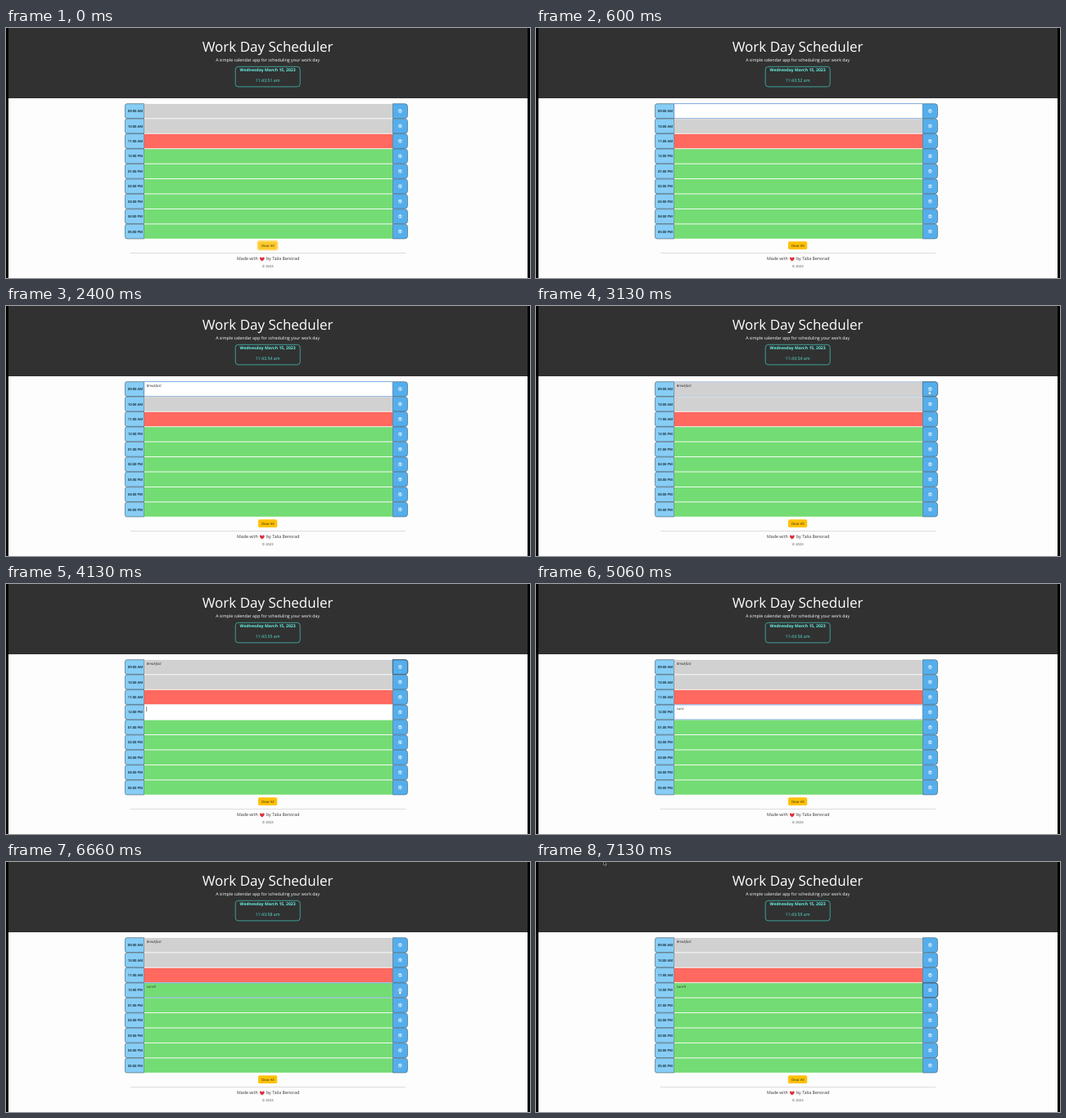
Recreate the animation shown at these times as an HTML page with a canvas. Size 640x306 px, loop 8 s.

```html
<!DOCTYPE html>
<html lang="en">
<head>
<meta charset="utf-8">
<title>Work Day Scheduler</title>
<style>
  html, body { margin: 0; width: 100%; height: 100%; overflow: hidden; background: #fdfdfd; }
  canvas { display: block; width: 640px; height: 306px; }
</style>
</head>
<body>
<canvas id="stage"></canvas>
<script>
const W = 640, H = 306, LOOP = 8000;
const canvas = document.getElementById('stage');
const ratio = window.devicePixelRatio || 1;
canvas.width = W * ratio;
canvas.height = H * ratio;
const ctx = canvas.getContext('2d');
ctx.scale(ratio, ratio);
ctx.textRendering = 'geometricPrecision';

const FAMILY = '"Open Sans", "Noto Sans", sans-serif';
const ROW_TOP = 92.4, ROW_H = 18.43;
const HOURS = ['09:00 AM', '10:00 AM', '11:00 AM', '12:00 PM', '01:00 PM',
               '02:00 PM', '03:00 PM', '04:00 PM', '05:00 PM'];
const PAST = '#d1d1d1', PRESENT = '#ff695f', FUTURE = '#74dc74';

// Each entry: row, focus and blur times, and the moment every letter lands
const ENTRIES = [
  { row: 0, text: 'Breakfast', focus: 330, blur: 3060, release: 4130,
    keys: [1000, 1200, 1330, 1530, 1600, 1730, 1800, 2060, 2260] },
  { row: 3, text: 'Lunch', focus: 4130, blur: 6660, release: Infinity,
    keys: [4530, 4660, 4860, 5000, 5200] },
];

// Pointer path: time, x, y
const SAVE_FIRST = [[2930, 474, 102], [3060, 480, 104], [3260, 480, 104], [3400, 474, 112]];
const SAVE_SECOND = [[6060, 474, 160], [6190, 497, 168], [6260, 490, 163], [6400, 480.5, 157.5],
                     [6860, 480.5, 157.5], [6930, 430, 125], [7000, 320, 82], [7130, 83, -0.5]];

const clamp = v => Math.max(0, Math.min(1, v));
// Fades in at `on` and out at `off`
const fade = (t, on, off) => clamp((t - on) / 150) * (1 - clamp((t - off) / 150));

function text(str, x, y, size, color, { align = 'center', style = '' } = {}) {
  ctx.font = `${style} ${size}px ${FAMILY}`;
  ctx.textAlign = align;
  ctx.fillStyle = color;
  ctx.fillText(str, x, y);
}

function box(x, y, w, h, radius, { fill, stroke, line = 0.6 }) {
  ctx.beginPath();
  ctx.roundRect(x, y, w, h, radius);
  if (fill) { ctx.fillStyle = fill; ctx.fill(); }
  if (stroke) { ctx.strokeStyle = stroke; ctx.lineWidth = line; ctx.stroke(); }
}

function rect(x, y, w, h, color) {
  ctx.fillStyle = color;
  ctx.fillRect(x, y, w, h);
}

function drawHeader(t) {
  rect(3, 0, 634, 86, '#313131');
  text('Work Day Scheduler', 319.6, 29, 17, '#fff');
  text('A simple calendar app for scheduling your work day', 319.6, 41, 5.28, '#fff');
  box(280.2, 47.3, 79, 24.6, 3.5, { stroke: '#43c3b9', line: 0.75 });
  text('Wednesday March 15, 2023', 319.6, 53.4, 5.1, '#66f3e4', { style: 'bold' });
  const second = 51 + Math.floor((t * 1.002 + 860) / 1000);
  text(`11:43:${second} am`, 319.6, 65.5, 5.28, '#58e6d8');
}

function drawDisk(x, y) {
  box(x - 1.7, y - 1.7, 3.4, 3.4, 0.5, { stroke: '#fff', line: 0.65 });
  rect(x - 1, y - 1.5, 1.8, 1.1, '#fff');
  rect(x - 0.5, y + 0.2, 1, 1, '#fff');
}

function drawRow(i, t) {
  const y = ROW_TOP + i * ROW_H;
  const entry = ENTRIES.find(e => e.row === i);
  const focused = entry && t >= entry.focus && t < entry.blur;
  const color = i < 2 ? PAST : i === 2 ? PRESENT : FUTURE;

  box(145.4, y + 0.3, 23.2, ROW_H - 0.6, [2.5, 0, 0, 2.5], { fill: '#87cdf5', stroke: '#3c5666' });
  text(HOURS[i], 157.9, y + 10.7, 4.15, '#0c1a22', { style: '600' });

  rect(168.9, y + 0.5, 303.3, ROW_H - 0.95, focused ? '#fff' : color);
  box(472.5, y + 0.3, 18, ROW_H - 0.6, [0, 3.5, 3.5, 0], { fill: '#55aeec', stroke: '#3a6078' });
  drawDisk(481.4, y + 9.2);
  if (!entry) return;

  const glow = fade(t, entry.focus, entry.blur);
  if (glow) {
    ctx.globalAlpha = glow;
    box(168.6, y + 0.2, 303.8, ROW_H - 0.3, 0.6, { stroke: '#5794d6', line: 0.8 });
    ctx.globalAlpha = 1;
  }
  const ring = fade(t, entry.blur, entry.release);
  if (ring) {
    ctx.globalAlpha = ring * 0.75;
    box(472.4, y + 0.2, 18.3, ROW_H - 0.4, [0.5, 3.5, 3.5, 0.5], { stroke: '#3f5f78', line: 1.3 });
    ctx.globalAlpha = 1;
  }
  const typed = entry.keys.filter(k => t >= k).length;
  text(entry.text.slice(0, typed), 171.8, y + 6.5, 4.3, '#2c2c2c', { align: 'left', style: 'italic' });
  if (i === 3 && focused && !typed) rect(171.5, y + 2.4, 0.6, 6, '#333');
}

function drawHeart(x, y) {
  ctx.beginPath();
  ctx.moveTo(x, y + 2.6);
  ctx.bezierCurveTo(x - 5.2, y - 0.8, x - 2.2, y - 4.2, x, y - 1.3);
  ctx.bezierCurveTo(x + 2.2, y - 4.2, x + 5.2, y - 0.8, x, y + 2.6);
  ctx.fillStyle = '#dc2f3e';
  ctx.fill();
}

function drawFooter(t) {
  const halo = 1 - clamp((t - 330) / 150);
  if (halo) {
    ctx.globalAlpha = halo * 0.5;
    box(307.3, 260.5, 24.6, 11.2, 2.4, { stroke: '#ffc107', line: 1.4 });
    ctx.globalAlpha = 1;
  }
  box(308, 261.2, 23.2, 9.8, 1.8, { fill: t < 60 ? '#ffca2c' : '#ffc107' });
  text('Clear All', 319.6, 267.5, 4.2, '#2b2410');
  rect(152, 275.1, 336, 0.7, '#cfcfcf');
  text('Made with', 282, 284.4, 5.28, '#333', { align: 'left' });
  drawHeart(312.8, 282.8);
  text('by Talia Benorad', 318, 284.4, 5.28, '#333', { align: 'left' });
  text('© 2023', 319.7, 292.6, 4.1, '#444');
}

function pathPoint(path, t) {
  const n = path.findIndex(p => p[0] > t);
  if (n === 0) return null;
  if (n < 0) return path[path.length - 1].slice(1);
  const [t0, x0, y0] = path[n - 1], [t1, x1, y1] = path[n];
  const k = (t - t0) / (t1 - t0);
  return [x0 + (x1 - x0) * k, y0 + (y1 - y0) * k];
}

function drawArrow(x, y) {
  ctx.beginPath();
  [[0, 0], [0, 4.2], [1, 3.4], [1.7, 4.8], [2.4, 4.4], [1.8, 3.1], [3, 3]]
    .forEach(([dx, dy]) => ctx.lineTo(x + dx, y + dy));
  ctx.closePath();
  ctx.fillStyle = '#111';
  ctx.strokeStyle = '#fff';
  ctx.lineWidth = 0.8;
  ctx.stroke();
  ctx.fill();
}

function drawHand(x, y) {
  box(x, y, 0.9, 3, 0.4, { fill: '#fff' });
  box(x - 0.7, y + 1.3, 3, 3, 1, { fill: '#fff', stroke: '#345', line: 0.3 });
}

function drawPointer(t) {
  const point = t < 3400 ? pathPoint(SAVE_FIRST, t) : pathPoint(SAVE_SECOND, t);
  if (!point) return;
  const onButton = t < 3400 || (t > 6330 && t < 6880);
  (onButton ? drawHand : drawArrow)(...point);
}

function draw(now) {
  const t = now % LOOP;
  rect(0, 0, W, H, '#000');
  rect(3, 0, 634, H, '#fdfdfd');
  drawHeader(t);
  HOURS.forEach((_, i) => drawRow(i, t));
  drawFooter(t);
  drawPointer(t);
}

const start = performance.now();
function frame() {
  draw(performance.now() - start);
  requestAnimationFrame(frame);
}
frame();
</script>
</body>
</html>
```
